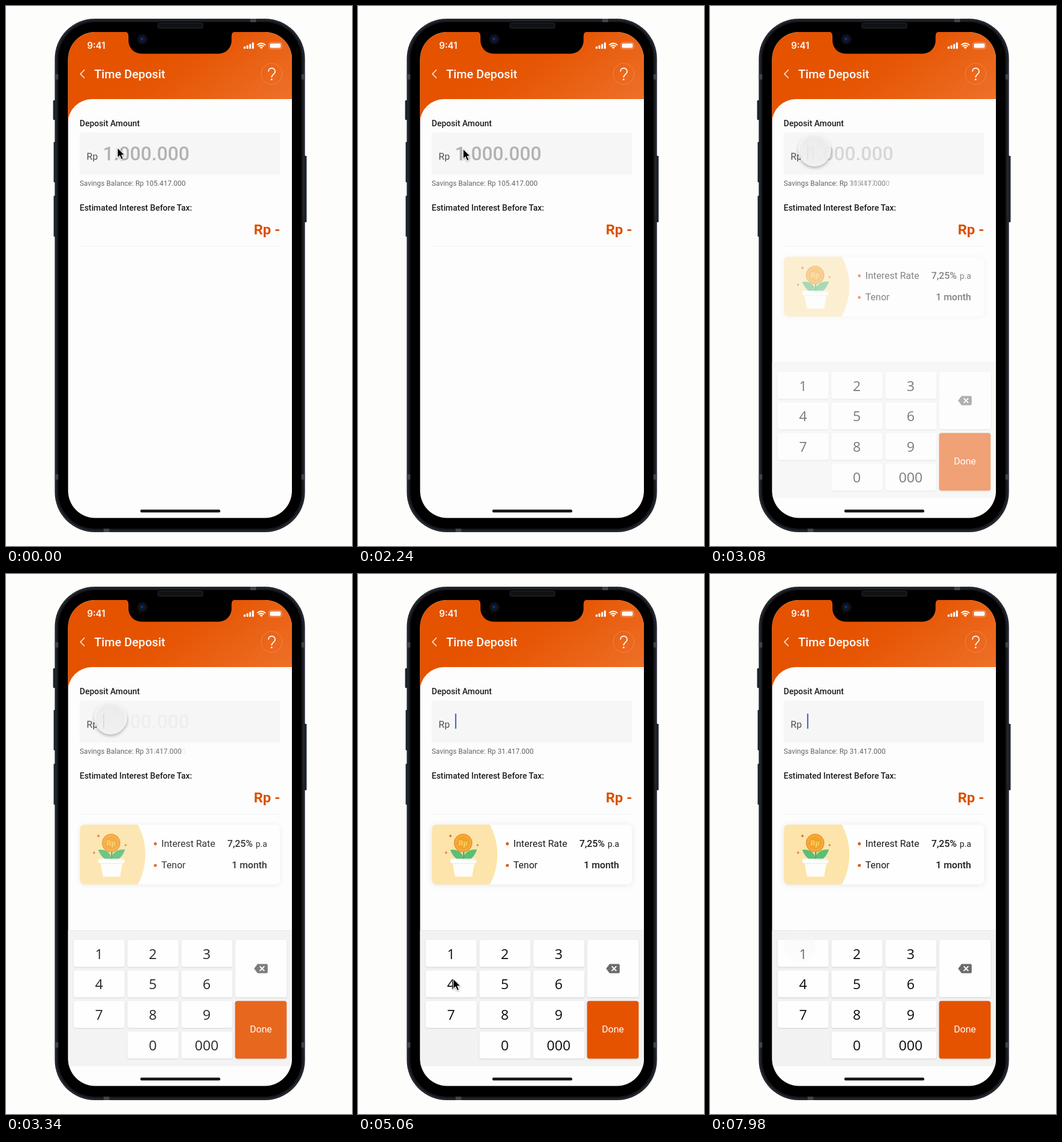
Animation, 599 px wide and 934 px high, one loop 8000 ms. Source, as an HTML page:

```html
<!DOCTYPE html>
<html lang="en">
<head>
<meta charset="utf-8">
<title>Time Deposit</title>
<style>
  html, body { margin: 0; width: 100%; height: 100%; overflow: hidden; background: #fdfdfc; }
  svg { display: block; width: 100vw; height: 100vh; }
  text { font-family: Roboto, sans-serif; font-size: 16.5px; fill: #1c1c1e; white-space: pre; }
  .label { font-size: 14.45px; font-weight: 500; }
  .medium { font-weight: 500; }
  .note { font-size: 12.4px; fill: #666; }
  .end { text-anchor: end; }
  .mid { text-anchor: middle; }
  .digit { font: 24px "Open Sans", "Noto Sans", sans-serif; fill: #0c0c0c; text-anchor: middle; }
  .key { fill: #fefefe; filter: drop-shadow(0 1px 1px rgba(30, 35, 60, .16)); }
  #card { filter: drop-shadow(0 1px 5px rgba(0, 0, 0, .09)); }
  #arrow { filter: drop-shadow(0 1.5px 1.5px rgba(0, 0, 0, .35)); }
</style>
</head>
<body>
<svg viewBox="0 0 599 934" preserveAspectRatio="none">
  <defs>
    <linearGradient id="orange" gradientUnits="userSpaceOnUse" x1="270" y1="70" x2="410" y2="260">
      <stop offset="0" stop-color="#e55300"/>
      <stop offset=".2" stop-color="#e65604"/>
      <stop offset="1" stop-color="#ef7530"/>
    </linearGradient>
    <linearGradient id="surface" x1="0" y1="0" x2="0" y2="1">
      <stop offset="0" stop-color="#f5f5f5"/>
      <stop offset="1" stop-color="#fcfcfc"/>
    </linearGradient>
    <clipPath id="screen"><rect x="107.5" y="45" width="387.5" height="840.5" rx="47"/></clipPath>
    <clipPath id="cardClip"><rect x="128" y="433.5" width="346.5" height="103.5" rx="8"/></clipPath>
  </defs>

  <!-- Phone body -->
  <g fill="#23262d">
    <rect x="81.5" y="163" width="6" height="34" rx="1.5"/>
    <rect x="82.5" y="235" width="5" height="70" rx="1.5"/>
    <rect x="82.5" y="328" width="5" height="71" rx="1.5"/>
    <rect x="514" y="259" width="6.5" height="115" rx="1.5"/>
  </g>
  <rect x="84.5" y="22" width="433" height="888" rx="69" fill="#15181d"/>
  <rect x="86.5" y="24" width="429" height="884" rx="67" fill="none" stroke="#2b303a" stroke-width="1.6"/>
  <path d="M84.5 118h7v9h-7zM510.5 118h7v9h-7zM84.5 810h7v9h-7zM510.5 810h7v9h-7zM423 22h10v6h-10zM169 903h10v7h-10z" fill="#40444d"/>
  <rect x="90.5" y="28" width="421" height="876" rx="63" fill="#000"/>

  <g clip-path="url(#screen)">
    <rect x="107" y="45" width="389" height="842" fill="#fdfdfd"/>
    <path d="M107 45H496V161H149A42 42 0 0 0 107 203Z" fill="url(#orange)"/>

    <!-- Status bar -->
    <text x="140.5" y="74" style="font:600 15.5px Inter, sans-serif;fill:#fff">9:41</text>
    <g fill="#fff">
      <rect x="411.5" y="70" width="3.2" height="4" rx=".8"/>
      <rect x="416.3" y="68" width="3.2" height="6" rx=".8"/>
      <rect x="421.1" y="65.7" width="3.2" height="8.3" rx=".8"/>
      <rect x="425.9" y="63" width="3.2" height="11" rx=".8"/>
      <path d="M442 74.2l-2.7-2.9q2.7-2.2 5.4 0z"/>
      <rect x="457" y="64.8" width="18.6" height="7.6" rx="2"/>
      <path d="M478.7 67v3.6q1.2-1.8 0-3.6z" opacity=".5"/>
    </g>
    <g fill="none" stroke="#fff">
      <path d="M434.9 67.6q7.1-6.4 14.2 0M437.4 70q4.6-4 9.2 0" stroke-width="2"/>
      <rect x="455.3" y="63" width="22" height="11.2" rx="3.4" opacity=".4"/>
    </g>

    <!-- Header -->
    <path d="M136 110.3l-7.2 7.2 7.2 7.2" fill="none" stroke="#fff" stroke-width="1.4"/>
    <text x="152.8" y="124.7" class="medium" style="font-size:20.65px;fill:#fff">Time Deposit</text>
    <circle cx="459.8" cy="117.3" r="18.2" fill="none" stroke="#fff" stroke-opacity=".2"/>
    <path d="M454.3 113.4c0-7.8 11.6-7.8 11.6 0 0 4.7-6 4.8-6 10.2" fill="none" stroke="#fff" stroke-width="1.9"/>
    <circle cx="459.9" cy="127.2" r="1.4" fill="#fff"/>

    <!-- Form -->
    <text x="127.5" y="207.5" class="label">Deposit Amount</text>
    <rect x="127.5" y="219" width="347" height="72.5" rx="4" fill="#f6f6f6"/>
    <text x="139.6" y="265.8" style="fill:#505050">Rp</text>
    <text id="hint" x="167.8" y="267" class="medium" style="font-size:33px;fill:#b3b3b3">1.000.000</text>
    <text x="127.5" y="311" class="note">Savings Balance: Rp <tspan id="oldBalance">105.417.000</tspan></text>
    <text x="127.5" y="311" class="note"><tspan fill-opacity="0">Savings Balance: Rp </tspan><tspan id="newBalance">31.417.000</tspan></text>
    <text x="127.5" y="353.6" class="label">Estimated Interest Before Tax:</text>
    <text x="474.6" y="395" class="end" style="font-size:24.8px;font-weight:600;fill:#dc5004">Rp -</text>
    <path d="M127.5 415.5h347" stroke="#f0f0f0"/>

    <g id="details">
      <rect x="168.2" y="241.5" width="2" height="26" fill="#2e5cab"/>

      <rect id="card" x="128" y="433.5" width="346.5" height="103.5" rx="8" fill="#fefefe"/>
      <path d="M128 433H228A109 109 0 0 1 228 537.5H128Z" fill="#fce4ab" clip-path="url(#cardClip)"/>
      <path d="M183 480V494" stroke="#3da564" stroke-width="2.5"/>
      <circle cx="182" cy="465.2" r="16" fill="#f0982c"/>
      <circle cx="182" cy="465.2" r="12.8" fill="#f2a22e" stroke="#f7b947" stroke-width="1.2"/>
      <text x="181.8" y="470" class="mid" style="font-size:13px;font-weight:700;fill:#fbcf5e">Rp</text>
      <path d="M159.5 477q14-2 20 7 3 4 2.5 9.500h-10q-8-5-12.500-16.500z" fill="#5dbd75"/>
      <path d="M206 476.500q-14-1-20 7-3 4-2.500 10h11q8-6 11.500-17z" fill="#5dbd75"/>
      <path d="M163.500 499h38.500l-4.500 24.500h-29.500z" fill="#fdfdfd"/>
      <path d="M163.500 499h38.500l-.5 2.500h-37.500z" fill="#efedea"/>
      <rect x="160" y="492.500" width="45" height="7.500" rx="1.500" fill="#fdfdfd"/>
      <path d="M177 493h27v2.500h-21q-4 0-6-2.500z" fill="#f3f1ee"/>
      <path id="sparkles" fill="#dc6426"/>
      <g fill="#dc5a1c"><circle cx="258.5" cy="466.6" r="2.600"/><circle cx="258.5" cy="504" r="2.600"/></g>
      <text x="269" y="471.5">Interest Rate</text>
      <text x="383.3" y="471.5" class="medium">7,25%</text>
      <text x="452" y="471.5" class="end" style="font-size:14.4px">p.a</text>
      <text x="269" y="509">Tenor</text>
      <text x="452" y="509" class="end medium">1 month</text>

      <rect x="107" y="616" width="389" height="235" fill="#f2f2f3"/>
      <path d="M107 616.5h389" stroke="#e6e6e6"/>
      <g id="keys"></g>
      <rect class="key" x="397" y="633" width="89" height="99" rx="4"/>
      <path d="M429.500 682.500l6-8h15.500q2 0 2 2v12q0 2-2 2h-15.500z" fill="#6c6c6c"/>
      <path d="M439.300 678.500l8 8m0-8l-8 8" stroke="#fff" stroke-width="1.9"/>
      <rect class="key" x="396.6" y="738.6" width="89.2" height="99.600" rx="4" style="fill:#e55300"/>
      <text x="441.3" y="792.6" class="mid" style="fill:#fff">Done</text>
    </g>

    <rect x="232.500" y="871" width="138.500" height="5" rx="2.500" fill="#1b1b1f"/>
  </g>

  <!-- Notch -->
  <path d="M205 44.500q7 0 7 7V60A22.500 22.500 0 0 0 234.500 82.500H368A22.500 22.500 0 0 0 390.500 60V51.500q0-7 7-7z" fill="#000"/>
  <rect x="263" y="29.500" width="78" height="9" rx="2.500" fill="#111214" stroke="#26272a"/>
  <circle cx="236" cy="57.300" r="8.800" fill="#0d1018"/>
  <circle cx="236" cy="57.300" r="5.300" fill="#0e1832"/>
  <circle cx="235.500" cy="57" r="2" fill="#213670"/>

  <!-- Pointer -->
  <g id="touch">
    <circle id="disc" r="28" fill="url(#surface)" fill-opacity=".82" stroke="#fff" stroke-opacity=".8"/>
  </g>
  <g id="arrow">
    <path d="M0 0V17.600L4 13.900 6.900 20.600 10 19.300 7.200 12.700H12.500Z" fill="#000" stroke="#fff" stroke-width="1.1"/>
  </g>
</svg>
<script>
const LOOP = 8000;
const find = id => document.getElementById(id);

find('keys').innerHTML = ['1', '2', '3', '4', '5', '6', '7', '8', '9', '', '0', '000'].map((name, i) => {
  if (!name) return '';
  const x = 117 + 93.2 * (i % 3), y = 633 + 52.8 * Math.floor(i / 3);
  return `<rect class="key" x="${x}" y="${y}" width="88.5" height="46.5" rx="4"/>
    <text class="digit" x="${x + 44}" y="${y + 32.6}">${name}</text>`;
}).join('');

const sparkle = (x, y, r) =>
  `M${x} ${y - r}Q${x} ${y} ${x + r} ${y}Q${x} ${y} ${x} ${y + r}Q${x} ${y} ${x - r} ${y}Q${x} ${y} ${x} ${y - r}Z`;
find('sparkles').setAttribute('d', sparkle(160, 453, 4) + sparkle(207, 469, 3) + sparkle(152.5, 482, 3.6));

// Each step: [time in ms, value, easing to the next step]
function play(id, property, steps) {
  const last = steps[steps.length - 1];
  const frames = [...steps, [LOOP, last[1]]].map(([time, value, easing = 'linear']) =>
    ({ offset: time / LOOP, [property]: value, easing }));
  find(id).animate(frames, { duration: LOOP, iterations: Infinity });
}
const at = (x, y) => `translate(${x}px, ${y}px)`;
const shadow = alpha => `drop-shadow(0 3px 2.5px rgba(0, 0, 0, ${alpha}))`;
const HOLD = 'step-end', GLIDE = 'ease-in-out';

const appear = [[0, 0], [2670, 0], [3430, 1]];
const vanish = appear.map(([time, value]) => [time, 1 - value]);
play('details', 'opacity', appear);
play('newBalance', 'fillOpacity', appear);
play('hint', 'opacity', vanish);
play('oldBalance', 'fillOpacity', vanish);

play('arrow', 'transform', [
  [0, at(193, 245), 'ease-out'], [600, at(182, 247)], [3750, at(182, 247), GLIDE],
  [4750, at(165, 700)], [5150, at(165, 700), GLIDE], [6000, at(156, 646)]
]);
play('arrow', 'opacity', [[0, 1, HOLD], [2400, 0, HOLD], [3640, 1, HOLD], [7880, 0]]);

play('touch', 'transform', [[0, at(181, 249), HOLD], [5000, at(155, 645)]]);
play('touch', 'opacity', [
  [0, 0], [2400, 0], [2640, 1], [3480, 1], [3640, 0], [7880, 0], [7990, .55]
]);
play('disc', 'filter', [[0, shadow(0)], [2500, shadow(0)], [2700, shadow(.3)], [3480, shadow(.3)], [3640, shadow(0)]]);
</script>
</body>
</html>
```
